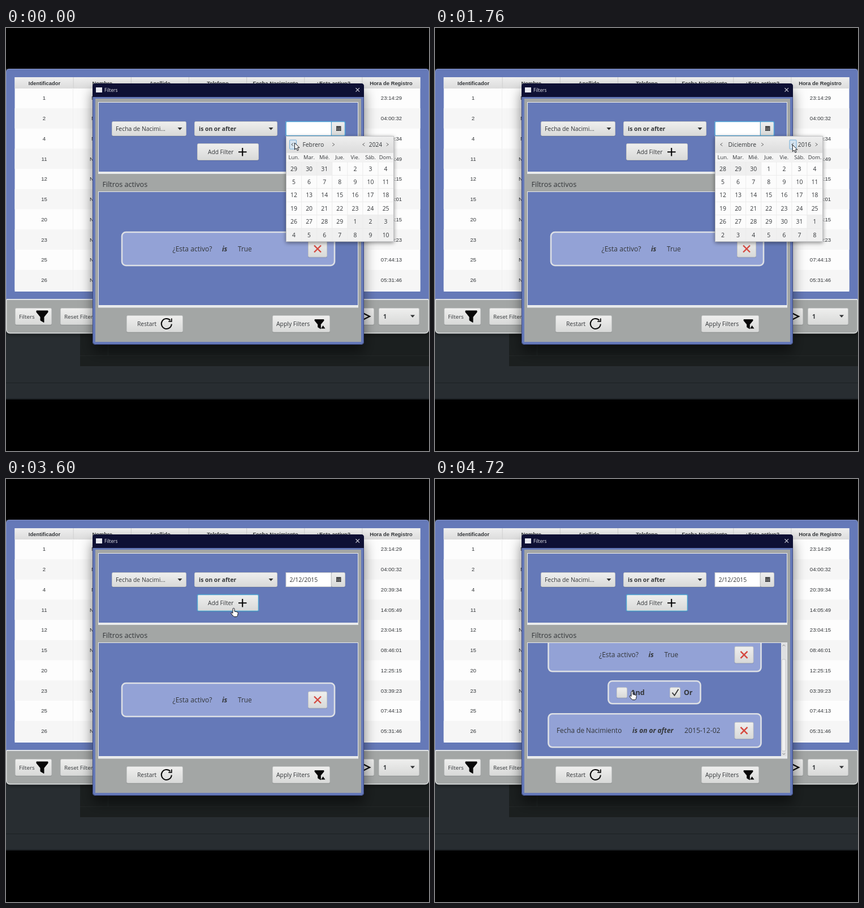
An HTML page that plays this animation: 748x748 px, repeating every 4800 ms.

```html
<!DOCTYPE html>
<html lang="es">
<head>
<meta charset="utf-8">
<title>Filters</title>
<style>
  html, body { margin: 0; width: 100%; height: 100%; overflow: hidden; background: #000; }
  svg { display: block; width: 100vw; height: 100vh; }
  text { font-family: "Open Sans", "Noto Sans", sans-serif; white-space: pre; }
  .arial { font-family: "Liberation Sans", Arial, sans-serif; }
</style>
</head>
<body>
<svg id="stage" viewBox="0 0 748 748" xmlns="http://www.w3.org/2000/svg">
  <defs>
    <linearGradient id="btn" x2="0" y2="1">
      <stop offset="0" stop-color="#efefee"/><stop offset="1" stop-color="#d8d9d8"/>
    </linearGradient>
    <linearGradient id="head" x2="0" y2="1">
      <stop offset="0" stop-color="#efefef"/><stop offset="1" stop-color="#dcdcdc"/>
    </linearGradient>
    <filter id="shade" x="-10%" y="-10%" width="120%" height="125%">
      <feDropShadow dx="0" dy="2" stdDeviation="3.5" flood-color="#000" flood-opacity=".45"/>
    </filter>
    <filter id="deep" x="-15%" y="-15%" width="130%" height="135%">
      <feDropShadow dx="0" dy="13" stdDeviation="11" flood-color="#000" flood-opacity=".5"/>
    </filter>
    <clipPath id="list"><rect x="164" y="290" width="458" height="200"/></clipPath>
    <clipPath id="left"><rect x="0" y="87" width="153" height="440"/></clipPath>
    <clipPath id="screen"><rect x="0" y="72" width="748" height="585"/></clipPath>
  </defs>
  <g id="back" clip-path="url(#screen)"></g>
  <g id="dialog"></g>
  <g id="form"></g>
  <g id="filters" clip-path="url(#list)"></g>
  <g id="popup"></g>
  <g id="cursor"></g>
</svg>
<script>
const LOOP = 4800, STEP = 80;
const BLUE = '#6579b8', GREY = '#a3a6a5', INK = '#333639';
const el = id => document.getElementById(id);

// Drawing helpers; text is placed by the middle of its capitals
const rect = (x, y, w, h, fill, more = '') =>
  `<rect x="${x}" y="${y}" width="${w}" height="${h}" fill="${fill}" ${more}/>`;
const path = (d, stroke, width = 1, more = 'fill="none"') =>
  `<path d="${d}" stroke="${stroke}" stroke-width="${width}" ${more}/>`;
const text = (x, y, str, size, more = '') =>
  `<text x="${x}" y="${(y + size * .36).toFixed(2)}" font-size="${size}" fill="${INK}" ${more}>${str}</text>`;
const MID = 'text-anchor="middle"', BOLD = 'font-weight="700"';
const SLANT = BOLD + ' font-style="italic"';

function button(x, y, w, h, focus) {
  return rect(x, y + 1, w, h, '#000', 'rx="2" opacity=".1"') +
    rect(x + .5, y + .5, w - 1, h - 1, 'url(#btn)',
      `rx="2" stroke="${focus ? '#4da3cf' : '#c4c6c6'}" stroke-width="${focus ? 1.5 : 1}"`);
}
const caret = (x, y) => `<path d="M${x - 4} ${y - 2}h8l-4 4.5z" fill="#303234"/>`;
const chevron = (x, y, dir, s = 2.2) =>
  path(`M${x + dir * -s / 1.2} ${y - s * 1.2}L${x + dir * s / 1.2} ${y}L${x + dir * -s / 1.2} ${y + s * 1.2}`, '#666', 1);
const funnel = (x, y, s) =>
  `<path transform="translate(${x} ${y}) scale(${s})" d="M-10 -10H10V-7.5L3 1V10.5L-3 7V1L-10 -7.5Z" fill="#080808" stroke="#080808" stroke-linejoin="round"/>`;

function drawBack() {
  const heads = ['Identificador', 'Nombre', 'Apellido', 'Telefono', 'Fecha Nacimiento', '¿Esta activo?', 'Hora de Registro'];
  const ids = [1, 2, 4, 11, 12, 15, 20, 23, 25, 26];
  const times = ['23:14:29', '04:00:32', '20:39:34', '14:05:49', '23:04:15', '08:46:01', '12:25:15', '03:39:23', '07:44:13', '05:31:46'];
  const col = i => 68 + i * 102.15;
  let s = rect(0, 72, 748, 585, '#282d31') + rect(131, 530, 617, 68, '#1b1f1f') +
    path('M131 579.5H748M180.5 560V579', '#222727') + path('M0 627.5H748', '#1d2124') +
    path('M0 656H748', '#1c2023', 2) +
    rect(.7, 400, 746.6, 139.5, GREY, 'rx="6" stroke="#dfe1e1" stroke-width="1.4" filter="url(#shade)"') +
    `<path d="M.5 480V78Q.5 72.5 6 72.5H742Q747.5 72.5 747.5 78V480Z" fill="${BLUE}" stroke="#8592c4"/>` +
    path('M1 480H747', '#dfe2e6', 2) +
    rect(15.5, 87, 717, 379, '#fdfdfd') + rect(15.5, 87, 717, 20, 'url(#head)');
  heads.forEach((h, i) => {
    s += text(col(i), 97.8, h, 9.4, `${MID} ${BOLD} class="arial"`);
    if (i) s += path(`M${col(i) - 51} 87V107`, '#cfcfcf');
  });
  ids.forEach((id, i) => {
    const y = 124 + i * 35.72;
    if (i % 2) s += rect(15.5, y - 17.8, 717, 35.7, '#f6f6f6');
    s += path(`M118.5 ${y - 17.8}v35.7M630 ${y - 17.8}v35.7`, '#efefef') +
      text(67.5, y, id, 9.6, `${MID} class="arial"`) +
      text(681.5, y, times[i], 9.6, `${MID} class="arial"`) +
      text(i < 3 ? 151 : 148, y, 'N', 9.6, 'class="arial" clip-path="url(#left)"');
  });
  s += button(16, 495, 65, 30) + text(23, 510, 'Filters', 9.8) + funnel(64, 510, 1) +
    button(96, 495, 80, 30) + text(103, 510, 'Reset Filters', 9.8) +
    button(600, 495, 51, 30) + path('M631 504L643 510L631 516', '#111', 2.4) +
    button(659, 495, 72, 30) + text(667, 510, '1', 10.5, BOLD) + caret(719, 509.5);
  el('back').innerHTML = s;
}

function drawDialog() {
  el('dialog').innerHTML =
    rect(153, 98, 480, 462, BLUE, 'rx="5" filter="url(#deep)"') +
    rect(153.5, 98.5, 479, 461, BLUE, 'rx="5" stroke="#3a4784"') +
    `<path d="M153 122V103Q153 98 158 98H628Q633 98 633 103V122Z" fill="#0e1034"/>` +
    rect(159, 105, 11, 9, '#e6e7ee') +
    text(174, 110, 'Filters', 8.3, 'style="fill:#e6e7ee"') +
    path('M618.5 106.2l6.5 6.5m0 -6.5l-6.5 6.5', '#d9dae4', 1.1) +
    rect(158, 125, 470, 430, GREY) +
    rect(163, 131, 460, 127, '#e9ebec') + rect(164, 132, 458, 122, BLUE) +
    rect(163, 289, 460, 205.5, '#e9ebec') + rect(164, 290, 458, 200, BLUE) +
    text(170.5, 276, 'Filtros activos', 12.6) +
    button(187, 165, 132, 26) + text(194, 178, 'Fecha de Nacimi...', 10.4) + caret(307.5, 178) +
    button(333, 165, 147, 26) + text(341, 178, 'is on or after', 10.35, BOLD) + caret(468.5, 178) +
    button(213, 508, 100, 30) + text(232, 523.5, 'Restart', 10.3) +
    path('M290.5 517A9 9 0 1 0 292.8 523.5', '#0a0a0a', 2) + path('M292.8 513.5V518.8H287.3', '#0a0a0a', 1.8) +
    button(471, 508, 102, 30) + text(478, 523.5, 'Apply Filters', 10.4) +
    funnel(554, 523.5, .8) + '<path d="M557 531.5L560.5 526L564.5 531.5Z" fill="#080808"/>';
}

function drawForm(t) {
  const open = t < 2720, field = t < 3520;
  let s = rect(495, 165.5, 80, 25, '#fff', 'stroke="#c2c4c6"') + button(575, 165, 25, 26);
  if (field) s += rect(495, 165.5, 104.5, 25, 'none', 'rx="2" stroke="#4fa5d8" stroke-width="1.5"') +
    path('M575.5 166V190', '#4fa5d8');
  s += rect(584, 173.5, 8.5, 8.5, '#36383a') + path('M584 176.6H592.5M584 179.2H592.5M586.8 176V182M589.7 176V182', '#a5a5a5', .6);
  if (!open) s += text(501.5, 178, '2/12/2015', 10.5);
  s += button(338, 204, 109, 30, !field) + text(357, 219.5, 'Add Filter', 10.2) +
    path('M411 219.2H425.5M418.2 212V226.5', '#080808', 2.1);
  el('form').innerHTML = s;
}

const card = (x, y, w, h) => rect(x + 1, y + 1, w - 2, h - 2, '#93a2d6', 'rx="7" stroke="#dde0e5" stroke-width="2.6"');
const cross = (x, y) => button(x, y - 15, 34, 30) + path(`M${x + 11} ${y - 6}l12 12m0 -12l-12 12`, '#d5483f', 2.4);
const activeCard = (x, y) => card(x, y - 30.5, 378, 61) + text(x + 90.5, y, '¿Esta activo?', 12.05) +
  text(x + 178, y, 'is', 12.2, SLANT) + text(x + 206, y, 'True', 11.8) + cross(x + 330, y);
const check = (x, y) => button(x, y - 9.5, 19, 19);

function drawFilters(t) {
  if (t < 3680) return el('filters').innerHTML = activeCard(204, 390.5);
  const down = t >= 4480, y = down ? 310.8 : 336.3, thumb = down ? 319 : 299;
  el('filters').innerHTML = activeCard(199.5, y) +
    card(305.5, y + 45.5, 165, 42) +
    check(321, y + 67) + text(346, y + 67, 'And', 12.5, BOLD) +
    check(415, y + 67) + text(440, y + 67, 'Or', 12.3, BOLD) +
    path(`M419.5 ${y + 67}l4 5l7 -11`, '#333', 1.8) +
    card(199.5, y + 103.5, 378, 61) + text(215, y + 134, 'Fecha de Nacimiento', 11.8) +
    text(349, y + 134, 'is on or after', 11.9, SLANT) + text(441, y + 134, '2015-12-02', 12.2) +
    cross(529.5, y + 134) +
    rect(612, 290, 10, 200, '#dfe0e1') +
    rect(613.2, thumb, 7, 162, '#f0f0f0', 'rx="2" stroke="#bbbdbe" stroke-width=".8"') +
    path('M614.5 295.5l2.3 -2.3l2.3 2.3M614.5 485l2.3 2.3l2.3 -2.3', '#777', .9);
}

// Each entry is one press on the "previous year" arrow
const PRESSES = [800, 1040, 1200, 1280, 1360, 1600, 1760, 1920];
const MONTHS = { 0: 'Enero', 1: 'Febrero', 11: 'Diciembre' };

function drawPopup(t, [px, py]) {
  if (t >= 2720) return el('popup').innerHTML = '';
  const month = t < 80 ? 1 : t < 160 ? 0 : 11;
  const year = (t < 160 ? 2024 : 2023) - PRESSES.filter(p => t >= p).length;
  const lead = (new Date(year, month, 1).getDay() + 6) % 7;
  const focusX = t < 800 ? 501.5 : 627;
  let s = rect(495, 191, 191, 187, '#f4f4f4', 'filter="url(#shade)"') +
    rect(495, 191, 191, 30, 'url(#head)') +
    rect(focusX, 198, 12, 16, '#d5e4f1', 'stroke="#75aed8" rx="1"') +
    chevron(506.5, 206, -1) + chevron(579, 206, 1) + chevron(632.5, 206, -1) + chevron(674.5, 206, 1) +
    text(543.3, 206.3, MONTHS[month], 10.4, MID) + text(653.5, 206.3, year, 10.2, MID);
  ['Lun.', 'Mar.', 'Mié.', 'Jue.', 'Vie.', 'Sáb.', 'Dom.'].forEach((d, i) =>
    s += text(509 + i * 27.1, 229, d, 9.4, MID));
  for (let i = 0; i < 42; i++) {
    const day = new Date(year, month, i - lead + 1);
    const x = 495.5 + (i % 7) * 27.1, y = 237 + (i / 7 | 0) * 23.45;
    const over = px >= x && px < x + 27.1 && py >= y && py < y + 23.45;
    const fill = over ? '#cce3f4' : day.getMonth() === month ? '#fcfcfc' : '#f0f0f0';
    s += rect(x, y, 27.1, 23.45, fill, 'stroke="#ebebeb" stroke-width=".8"') +
      text(x + 13.5, y + 11.8, day.getDate(), 10.4, MID);
  }
  el('popup').innerHTML = s + rect(495.5, 191.5, 190, 186, 'none', 'stroke="#c4c5c7"');
}

// Pointer track: time, x, y
const TRACK = [[0, 510.5, 203], [160, 510.5, 203], [320, 654, 209], [400, 654, 209], [640, 632.3, 206.5],
  [1840, 632.3, 206.5], [2400, 566.5, 248.5], [2880, 566.5, 248.5], [3440, 403, 229], [3920, 403, 229],
  [4240, 487.5, 376], [4480, 487.5, 376], [4720, 349, 376], [4800, 349, 376]];

function pointer(t) {
  const i = TRACK.findIndex(k => k[0] > t);
  const [a, b] = [TRACK[i - 1], TRACK[i]];
  const u = (t - a[0]) / (b[0] - a[0]), e = u * u * (3 - 2 * u);
  return [a[1] + (b[1] - a[1]) * e, a[2] + (b[2] - a[2]) * e];
}

function drawCursor(t, [x, y]) {
  const onAdd = t > 2720 && x > 338 && x < 447 && y > 204 && y < 234;
  const onAnd = t > 4480 && x < 372;
  const shape = onAdd || onAnd
    ? 'M-2 1.2Q-2 -.6 -.5 -.6Q1 -.6 1 1.2V5L5.5 6Q7.5 6.5 7.3 8.5L6.5 12.5Q6 14.5 4 14.5H1Q-.5 14.5 -1.5 13L-4.8 9Q-5.5 7.5 -4.3 7.2Q-3.3 7 -2 8.5Z'
    : 'M0 0V12L2.8 9.5L4.7 13.8L6.7 12.9L4.8 8.7H8.4Z';
  el('cursor').innerHTML = `<g transform="translate(${x.toFixed(1)} ${y.toFixed(1)})">` +
    path(shape, '#15171c', 1, 'fill="#fff" stroke-linejoin="round"') + '</g>';
}

function draw(t) {
  const p = pointer(t);
  drawForm(t);
  drawFilters(t);
  drawPopup(t, p);
  drawCursor(t, p);
}

let last = -1;
const start = performance.now();
function tick() {
  const t = Math.floor((performance.now() - start) % LOOP / STEP) * STEP;
  if (t !== last) draw(last = t);
  requestAnimationFrame(tick);
}
drawBack();
drawDialog();
tick();
</script>
</body>
</html>
```
